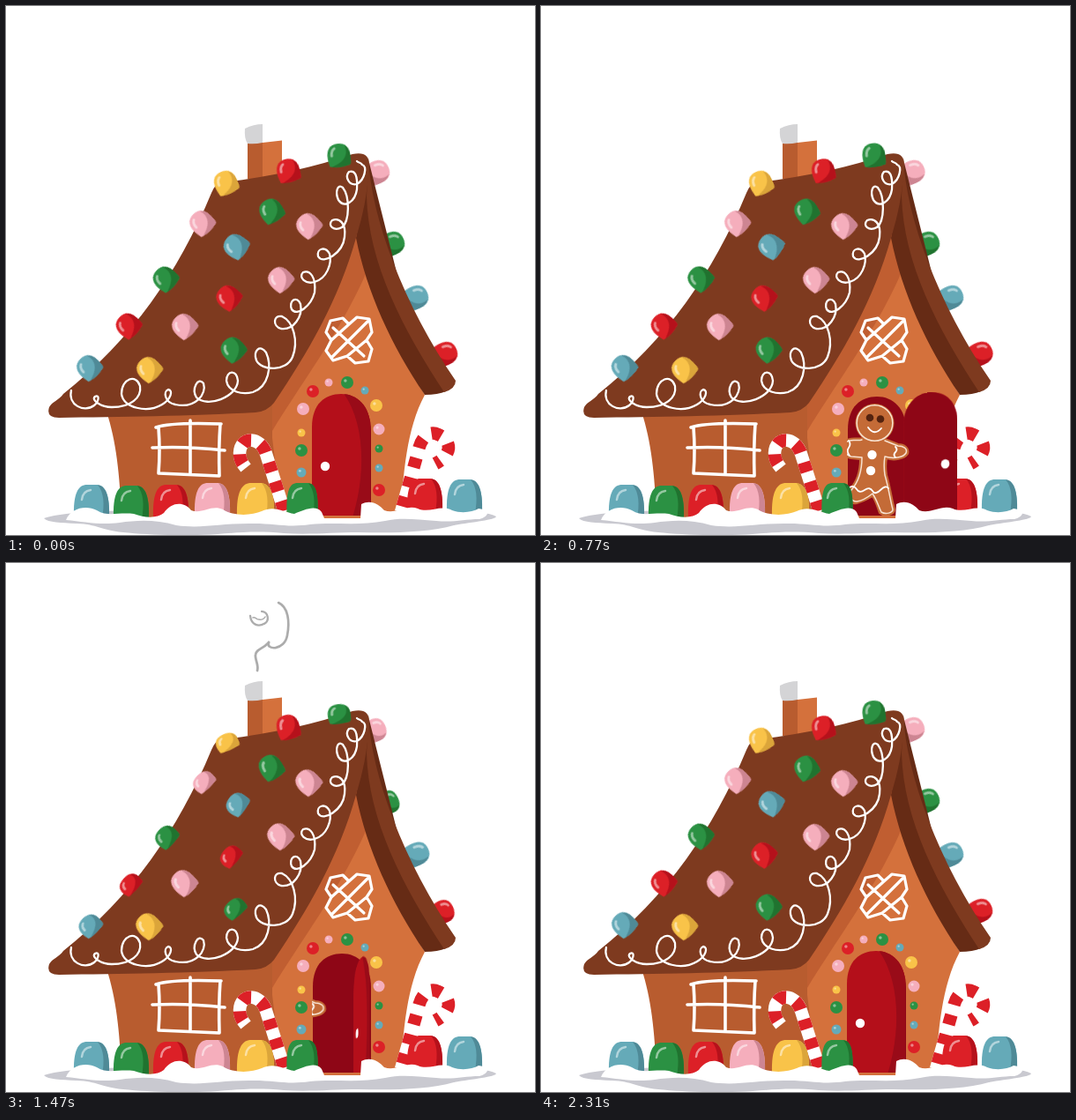
Animation, 600 px wide and 600 px high, one loop 2.38 s. Source, as an HTML page:

```html
<!DOCTYPE html>
<html lang="en">
<head>
<meta charset="utf-8">
<title>Gingerbread house</title>
<style>
html, body { margin: 0; width: 100%; height: 100%; overflow: hidden; background: #fff; }
svg { display: block; width: 100vw; height: 100vh; }
.ice { fill: none; stroke: #fff; stroke-linecap: round; stroke-linejoin: round; }

.squash, .swing, .skew, .back, .man, .smoke path { animation: 2380ms linear infinite; }

.squash { animation-name: squash; }
@keyframes squash {
  0%, 23.53%, 47.06%, 70.59%, 100% { transform: scaleY(1); }
  2.94%, 50% { transform: scaleY(.84); }
  5.88%, 52.94% { transform: scaleY(.73); }
  8.82%, 55.88% { transform: scaleY(.71); }
  11.76%, 58.82% { transform: scaleY(.92); }
  14.71%, 61.76% { transform: scaleY(1.05); }
  20.59%, 67.65% { transform: scaleY(1.02); }
}

.swing, .skew { transform-origin: 412px 0; }
.swing { animation-name: swing; animation-timing-function: ease-in-out; }
@keyframes swing {
  0%, 8.4% { transform: scaleX(1); }
  28.4%, 50% { transform: scaleX(-.93); }
  70.59%, 100% { transform: scaleX(1); }
}
.skew { animation-name: skew; }
@keyframes skew {
  0%, 7.56%, 70.59%, 100% { transform: skewY(0deg); }
  18%, 60.5% { transform: skewY(-15deg); }
  28.4%, 50% { transform: skewY(3deg); }
}
.back { animation-name: back; animation-timing-function: step-end; }
@keyframes back {
  0% { opacity: 0; }
  18.6% { opacity: 1; }
  60% { opacity: 0; }
}

.man { animation-name: man; }
@keyframes man {
  0%, 9% { transform: translateX(-85px); animation-timing-function: ease-out; }
  26.3%, 51.5% { transform: translateX(0); animation-timing-function: ease-in; }
  65%, 100% { transform: translateX(-85px); }
}

.smoke path { fill: none; stroke: #acacac; stroke-linecap: round; }
.tail { animation-name: tail !important; }
.curl { animation-name: curl !important; }
.hook { animation-name: hook !important; }
.puff { animation-name: puff !important; }
@keyframes tail {
  0%, 44% { d: path("M286 124C287 122 287 121 288 120C289 119 289 118 290 117"); stroke-width: 2.5; opacity: 0; }
  44.1% { opacity: 1; }
  50% { d: path("M288 121C291 123 291 117 293 117C294 118 297 116 299 112"); stroke-width: 3; }
  61.76% { d: path("M285 122C287 116 282 109 283 104C284 97 291 98 298 90"); stroke-width: 2.8; }
  73.53% { d: path("M289 121C288 118 286 117 286 113C288 112 291 110 293 105"); stroke-width: 1; opacity: 1; }
  82%, 100% { d: path("M289 108C288 106 287 104 287 102C288 101 290 100 291 99"); stroke-width: .4; opacity: 0; }
}
@keyframes curl {
  0%, 44% { d: path("M290 117C291 116 292 115 292 114C292 112 291 110 290 109"); stroke-width: 2; opacity: 0; }
  44.1% { opacity: 1; }
  50% { d: path("M299 112C304 109 308 104 307 98C308 92 306 87 304 84"); stroke-width: 2.6; }
  61.76% { d: path("M298 90C294 99 316 100 319 82C322 66 320 50 309 45"); stroke-width: 2.7; }
  73.53% { d: path("M307 70C304 84 316 85 324 82C329 80 331 75 331 67"); stroke-width: 1; opacity: 1; }
  88%, 100% { d: path("M313 61C312 68 318 73 324 70C328 68 329 64 328 60"); stroke-width: .4; opacity: 0; }
}
@keyframes hook {
  0%, 46% { d: path("M285 113C286 115 288 116 290 115C292 114 293 111 293 109"); stroke-width: 1.5; opacity: 0; }
  46.1% { opacity: 1; }
  50% { d: path("M279 97C283 101 283 104 288 102C296 103 300 100 300 90"); stroke-width: 2.8; }
  61.76% { d: path("M277 60C278 70 286 73 293 69C299 66 298 56 290 55"); stroke-width: 2.3; }
  73.53% { d: path("M278 48C278 40 285 41 286 35C292 28 301 31 306 35"); stroke-width: 1.1; opacity: 1; }
  90%, 100% { d: path("M280 37C280 31 285 31 287 27C291 22 299 23 303 27"); stroke-width: .4; opacity: 0; }
}
@keyframes puff {
  0%, 47% { d: path("M290 105C291 104 292 104 293 103C294 102 295 102 296 101"); stroke-width: 1.5; opacity: 0; }
  47.1% { opacity: 1; }
  50% { d: path("M292 92C295 88 297 91 299 90C301 88 303 89 305 85"); stroke-width: 2.5; }
  61.76% { d: path("M280 62C283 61 285 65 287 64C290 65 293 63 294 61"); stroke-width: 1.5; }
  73.53% { d: path("M284 47C286 50 290 46 293 48C296 54 299 57 300 62"); stroke-width: 1; opacity: 1; }
  88%, 100% { d: path("M284 38C286 40 289 38 291 40C294 43 296 46 296 49"); stroke-width: .4; opacity: 0; }
}
</style>
</head>
<body>
<svg viewBox="0 0 600 600">
  <defs>
    <clipPath id="sill"><rect x="340" y="430" width="145" height="149"/></clipPath>
    <clipPath id="jamb"><rect x="347" y="430" width="130" height="149"/></clipPath>
    <path id="leaf" d="M347 600V478C347 451 362 440 380 440S413 453 413 478V600Z"/>
    <clipPath id="leafClip"><use href="#leaf"/></clipPath>
  </defs>

  <path fill="#c9c9d0" d="M43 581C60 575 100 573 140 572H470C510 571 545 573 556 579C555 583 530 585 508 589C480 597 440 598 400 597C370 597 345 600 315 598C285 595 265 597 240 599C205 601 160 600 133 597C105 594 105 588 80 587C62 586 48 586 43 581Z"/>

  <g class="smoke">
    <path class="tail"/><path class="curl"/><path class="hook"/><path class="puff"/>
  </g>

  <path fill="#b85c2f" d="M274 152H291V196H274Z"/>
  <path fill="#d4713c" d="M291 155L313 152.500V195H291Z"/>
  <path fill="#d4d4d6" d="M271 139Q281 134 291 134V155Q282 157 274 156Q270 150 271 139Z"/>

  <g id="sideDrops"></g>

  <path fill="#b85c2f" d="M114 460C125 494 129 530 131 580H315L303 450Z"/>
  <path fill="#d4713c" d="M397 258L302 456V490L313 580H447C451 530 454 480 475 441L450 400Z"/>
  <path fill="#c05e31" d="M397 258L302 452V482C330 435 378 372 408 304Z"/>

  <path fill="#662b15" d="M412 178L397 263C409 324 437 385 475 441Q490 441 499 437L450 330Z"/>
  <path fill="#7e3a1f" d="M411 172C414 240 451 339 510 425Q510 434 497 438C449 365 411 291 409 216Z"/>
  <path fill="#7e3a1f" d="M49 455C52 449 60 447 65 440C143 378 195 303 233 212Q237 201 247 200C304 193 352 182 393 168Q412 164 412 180C410 214 405 236 397 263C378 332 342 394 304 450Q296 460 283 461C210 465 127 466 60 467Q45 467 49 455Z"/>

  <path class="ice" stroke-width="2.3" d="M74 436C70 452 88 462 100 453C106 448 106 440 101 443C96 447 108 455 120 455C142 455 154 444 152 431C148 417 131 422 131 440C133 456 160 462 177 452C187 446 190 436 184 435C178 437 180 450 192 452C215 457 228 440 224 428C218 420 210 434 216 444C228 456 262 444 263 425C262 412 250 413 250 425C252 438 268 441 280 438C298 432 302 408 295 393C288 383 280 391 284 402C290 414 318 415 325 398C332 380 326 358 313 352C303 350 302 363 312 366C326 368 337 352 334 338C330 328 320 334 324 344C330 353 346 340 350 325C352 308 345 299 337 302C331 308 340 316 350 313C364 309 370 292 367 281C362 272 352 275 354 284C360 294 382 280 384 262C386 246 378 240 370 243C364 249 372 256 381 251C390 244 390 216 382 206C376 201 373 211 377 220C384 230 396 222 398 208C399 192 396 186 389 188C384 194 389 204 398 202C407 197 410 182 404 180C402 177 400 178 398 176"/>

  <g id="roofDrops"></g>

  <path class="ice" stroke-width="3.6" d="M170 478Q187 472 244 474M173 478Q175 505 173 530L242 533Q241 502 243 474M209 470V531M166 501Q205 499 248 504"/>
  <path class="ice" stroke-width="3.2" d="M363 370L368 357L382 354L389 361L398 353L412 355L415 370L409 379L415 389L411 403L396 405L387 397L371 402L363 391L369 379ZM369 379L389 361M387 397L409 379M371 365L406 397M410 358L370 398"/>

  <g id="dots"></g>
  <g id="canes"></g>
  <g id="backDrops"></g>

  <use href="#leaf" x="1" y="3" fill="#8e0616" clip-path="url(#sill)"/>
  <g clip-path="url(#sill)">
    <g class="swing"><g class="skew">
      <use href="#leaf" fill="#b40f1a"/>
      <path fill="#990b18" clip-path="url(#leafClip)" d="M382 438C409 474 410 541 386 600H416V438Z"/>
      <use class="back" href="#leaf" fill="#8e0616"/>
      <circle cx="362" cy="522" r="5.2" fill="#fff"/>
    </g></g>
  </g>

  <g clip-path="url(#jamb)">
    <g class="man">
      <path fill="#c46b37" stroke="#c46b37" stroke-width="2" d="M365 490C360 492 350 488 344 494C338 502 344 512 352 513L362 514C362 528 358 540 350 548C345 558 350 566 358 564C366 562 371 559 376 556C380 562 382 570 384 575C390 580 401 577 401 571C398 560 396 545 392 532C391 525 391 518 392 513C400 516 412 514 416 508C418 501 412 497 405 497L390 491Z"/>
      <circle cx="378.500" cy="473" r="22" fill="#c46b37"/>
      <g class="ice" stroke-width="1.5">
        <circle cx="378.500" cy="473" r="20.300" stroke="#f8e2d0"/>
        <path stroke="#f8e2d0" d="M364 492C358 494 351 490 346 495C341 502 346 510 352 511L364 512C364 528 360 540 352 549C348 556 352 562 358 562C366 561 371 557 376 553C381 560 383 568 386 574C391 577 399 575 399 571C396 560 394 545 390 532C389 525 389 517 390 511C400 514 411 512 414 507C416 502 411 499 405 499L390 493"/>
        <path stroke-width="1.8" d="M350 546Q355 543 358 548T367 549T376 550T385 549T394 547M402 500Q405 503 402 506T402 512M349 493Q352 497 349 501T350 510"/>
        <path stroke-width="1.800" d="M371 478Q378 488 386 479"/>
      </g>
      <g fill="#54230f"><circle cx="373" cy="467" r="4.300"/><circle cx="385" cy="468.500" r="4.300"/></g>
      <g fill="#fff"><circle cx="375.500" cy="509" r="5.200"/><circle cx="374" cy="527" r="5.200"/></g>
    </g>
  </g>

  <path fill="#d4713c" d="M358 578H405L402 581H360Z"/>
  <g id="frontDrops"></g>
  <path fill="#fff" d="M68 583C74 569 91 566 103 572C116 580 126 574 145 576C158 581 172 581 179 575C188 562 202 562 210 572C222 577 233 565 246 571C258 579 279 578 290 573C304 566 315 574 327 576C338 572 351 565 358 574L361 581H402L403 565C414 559 424 566 429 572C442 577 454 565 467 570C480 576 493 565 506 572C517 576 529 574 536 570C552 572 546 580 537 582C520 582 508 586 488 584C464 582 447 580 430 584C400 590 371 585 345 588C317 592 304 586 275 587C240 587 222 593 193 589C170 582 148 583 129 586C107 589 89 585 68 583Z"/>
</svg>

<script>
const shades = {
  red: ["#dc2027", "#b5111b"], green: ["#2b9143", "#20732f"], yellow: ["#f9c349", "#dba53a"],
  pink: ["#f5aebc", "#cd8592"], blue: ["#65aab8", "#4f8a97"]
};
const fill = (id, parts) => { document.getElementById(id).innerHTML = parts.join(""); };

// x, y of the base, tilt, colour, delay of the squash in ms
const roofDrop = ([x, y, tilt, color, delay]) => {
  const [main, dark] = shades[color];
  return `<g transform="translate(${x} ${y}) rotate(${tilt})">
    <g class="squash" style="animation-delay:${delay ? delay - 2380 : 0}ms">
      <path fill="${main}" d="M-11.500 0C-15 -15 -12 -25 0 -25S15 -15 12 0Q0 3 -11.500 0Z"/>
      <path fill="${dark}" d="M8 -22C14 -18 14 -9 12 0Q0 3 -10 .5C2 -2 12 -9 8 -22Z"/>
      <path class="ice" stroke-width="3" opacity=".5" d="M-8 -12Q-8 -18 -4 -20"/>
    </g></g>`;
};

const groundDrop = ([x, top, color, w = 20]) => {
  const [main, dark] = shades[color];
  return `<g transform="translate(${x} ${top})">
    <path fill="${main}" d="M${-w} 38C${-w - 1} 9 -15 0 -5 0H5C15 0 ${w + 1} 9 ${w} 38Z"/>
    <path fill="${dark}" d="M7 .2C16 1 ${w + 1} 12 ${w} 38H12C15 22 14 8 7 .2Z"/>
    <path class="ice" stroke-width="2.500" opacity=".5" d="M-11 17Q-10 7 -1 6"/></g>`;
};

const dot = ([x, y, r, color]) =>
  `<circle cx="${x}" cy="${y}" r="${r}" fill="${shades[color][0]}"/>
   <circle cx="${x - r * .3}" cy="${y - r * .3}" r="${r * .25}" fill="#fff" opacity=".45"/>`;

// path from the hook's end down the stem, shift of the stripes
const cane = ([d, shift]) => `<g fill="none" stroke-width="14.500">
  <path stroke="#fff" d="${d}"/>
  <path stroke="#dc2027" stroke-dasharray="11.500" stroke-dashoffset="${shift}" d="${d}"/></g>`;

const early = 0, mid = 210, late = 280;

fill("sideDrops", [
  [411, 193, 65, "pink", late], [428, 274, 65, "green", mid],
  [455, 335, 65, "blue", early], [488, 399, 65, "red", late]
].map(roofDrop));

fill("roofDrops", [
  [379, 181, -8, "green", late], [323, 198, -15, "red", early], [254, 211, -25, "yellow", mid],
  [307, 242, -33, "green", early], [230, 254, -45, "pink", mid], [351, 257, -45, "pink", early],
  [270, 279, -55, "blue", late], [189, 317, -48, "green", late], [319, 318, -45, "pink", early],
  [261, 338, -50, "red", mid], [147, 370, -48, "red", mid], [210, 371, -45, "pink", early],
  [265, 398, -42, "green", mid], [102, 418, -45, "blue", late], [170, 420, -45, "yellow", early]
].map(roofDrop));

fill("dots", [
  [348, 437, 7, "red"], [366, 427, 4.5, "pink"], [387, 427, 7, "green"], [407, 436, 4.5, "blue"],
  [420, 453, 7, "yellow"], [337, 457, 7, "pink"], [335, 484, 4.5, "yellow"], [335, 504, 7, "green"],
  [335, 529, 5.5, "blue"], [423, 480, 6.5, "pink"], [423, 502, 4.5, "green"],
  [423, 524, 4.5, "blue"], [423, 549, 7, "red"]
].map(dot));

fill("canes", [
  ["M272 524C268 519 265 515 265 507C266 487 289 488 295 508L316 574", -6],
  ["M487 519C508 508 505 492 490 486C482 482 471 486 467 507L448 574", 5]
].map(cane));

fill("backDrops", [[475, 536, "red"], [520, 537, "blue"]].map(groundDrop));

fill("frontDrops", [
  [97, 543, "blue"], [142, 544, "green"], [187, 543, "red"], [234, 541, "pink"],
  [283, 541, "yellow", 21], [336, 541, "green", 17.5]
].map(groundDrop));
</script>
</body>
</html>
```
